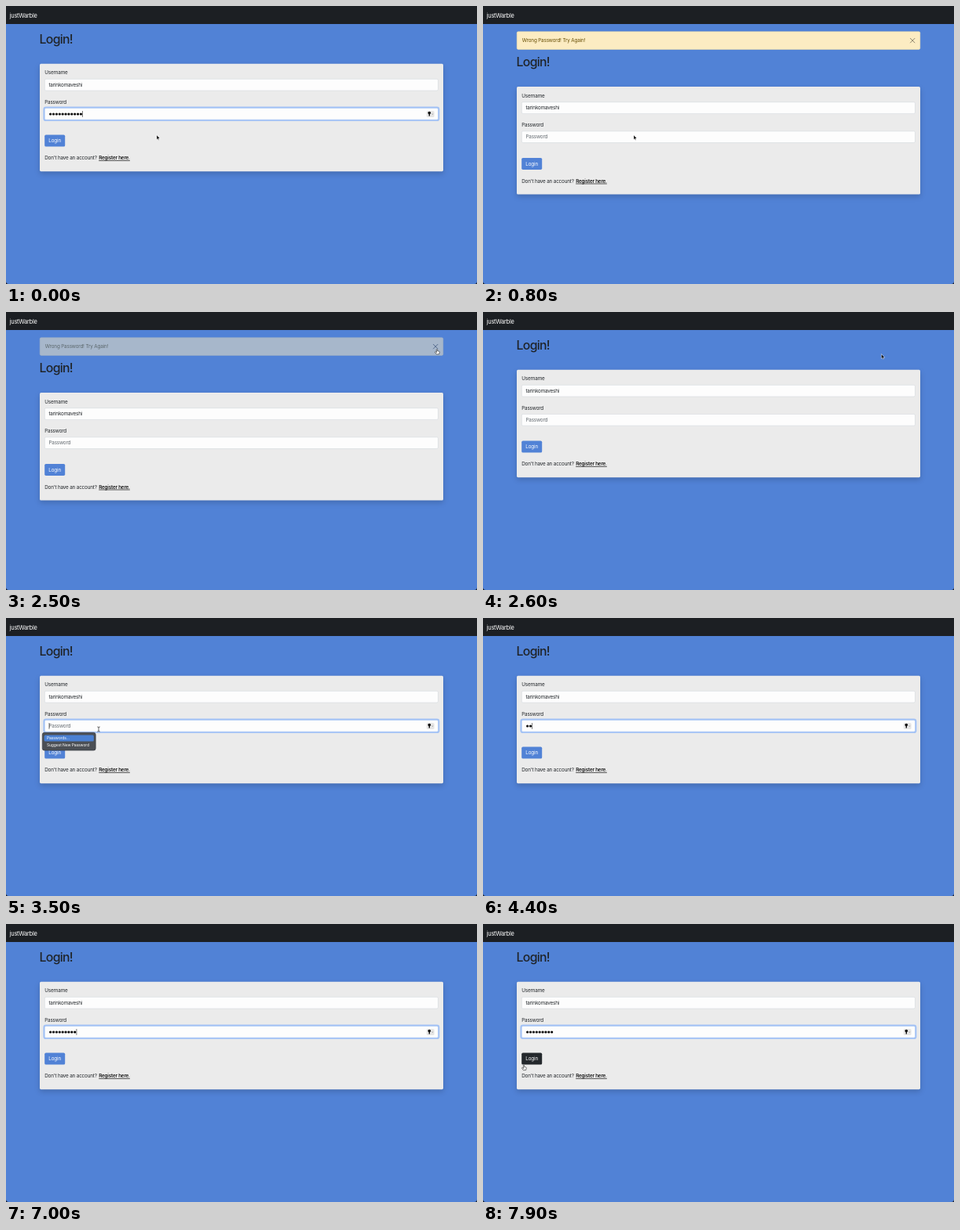
Write an HTML page that moves like this. It is 600x355 px and loops after 8000 ms.

```html
<!DOCTYPE html>
<html lang="en">
<head>
<meta charset="utf-8">
<title>Login</title>
<style>
  html, body { margin: 0; width: 100%; height: 100%; overflow: hidden; background: #111; }
  svg { display: block; width: 600px; height: 355px; }
  text { font: 6.3px Inter, "Open Sans", sans-serif; letter-spacing: -.025em; fill: #1f2327; }
  .brand { font-size: 7.5px; letter-spacing: -.035em; fill: #fff; }
  .title { font-size: 15.8px; font-weight: 500; letter-spacing: -.045em; }
  .link { font-weight: 500; text-decoration: underline; fill: #000; }
  .hint { fill: #62696f; }
  .warn { fill: #664d03; }
  .white { fill: #fff; }
  .menu text { font-size: 5px; letter-spacing: -.02em; fill: #fff; }
  .card { fill: #ebebeb; filter: drop-shadow(0 3px 3.2px rgba(0, 0, 0, .17)); }
  .field { fill: #fdfdfd; stroke: #cdd2d8; stroke-width: .5; }
  .pointer { stroke-linejoin: round; stroke-linecap: round; }
</style>
</head>
<body>
<svg viewBox="0 0 600 355">
  <path fill="#5182d6" d="M0 0H600V351.500Q600 355 596.500 355H3.500Q0 355 0 351.500Z"/>
  <rect width="600" height="23" fill="#1c1f23"/>
  <text class="brand" x="4.700" y="14.700">justWarble</text>

  <g id="alert">
    <rect x="43.200" y="32.700" width="513.600" height="22.700" rx="1.600" fill="#fcecc2" stroke="#f6e0a6" stroke-width=".5"/>
    <text class="warn" x="49.800" y="46.400">Wrong Password! Try Again!</text>
    <path id="close" d="M544.400 41.300l5.600 5.600m0-5.600l-5.600 5.600" stroke="#000" stroke-width=".8" stroke-linecap="round"/>
  </g>

  <g id="page">
    <text class="title" x="42.600" y="48">Login!</text>
    <rect class="card" x="43" y="73.700" width="514" height="137.500" rx="1.600"/>
    <text x="49.200" y="87.400">Username</text>
    <rect class="field" x="49.300" y="93.300" width="501.200" height="14.700" rx="1.600"/>
    <text x="54.400" y="102.900">tarinkomaveshi</text>
    <text x="49.200" y="124.700">Password</text>
    <rect id="ring" x="48.300" y="129.400" width="503.200" height="16.800" rx="2.500" fill="none" stroke="#a3c2f5" stroke-width="1.800"/>
    <rect id="secret" class="field" x="49.300" y="130.400" width="501.200" height="14.800" rx="1.600"/>
    <text id="hint" class="hint" x="54.400" y="140">Password</text>
    <g id="dots"></g>
    <rect id="caret" y="134" width=".6" height="7.800" fill="#222"/>
    <g id="key">
      <rect x="535.800" y="133.900" width="9.800" height="8" rx="1.500" fill="#e6e6e6"/>
      <circle cx="539.300" cy="136.500" r="1.800"/>
      <path d="M539.300 137v3.600" stroke="#000" stroke-width="1.300"/>
      <path d="M542.500 137.500l.9.900.9-.9" fill="none" stroke="#555" stroke-width=".5"/>
    </g>
    <rect id="button" x="49.200" y="164.500" width="26" height="15.100" rx="1.700"/>
    <text class="white" x="54.300" y="174.300">Login</text>
    <text x="49.200" y="196.300">Don't have an account?</text>
    <text class="link" x="118.200" y="196.300">Register here.</text>
  </g>

  <g id="menu" class="menu">
    <rect x="46.300" y="146.300" width="67.900" height="22.800" rx="2.700" fill="#4b4f55" stroke="#33373d" stroke-width=".6"/>
    <rect x="48.600" y="149.400" width="63.200" height="8" rx="1.500" fill="#4a80d3"/>
    <text x="51.900" y="155.200">Passwords…</text>
    <text x="51.900" y="164">Suggest New Password</text>
  </g>

  <g id="cursor" class="pointer">
    <path id="arrow" d="M0 0V5.500L1.300 4.400L2.100 6.300L3 5.900L2.200 4.100H3.900Z" fill="#000" stroke="#fff" stroke-width=".45"/>
    <path id="beam" d="M-1.300-3Q0-3 0-2.300V2.300Q0 3-1.300 3M1.300-3Q0-3 0-2.300M0 2.300Q0 3 1.300 3" fill="none" stroke="#222" stroke-width=".7"/>
    <path id="hand" d="M-.6.500Q0-.3.600.500V2.400L2.700 2.900Q3.400 3.200 3.200 4.200L2.600 6.600H-.7L-2.500 4.100Q-2.500 3.200-1.600 3.500L-.6 4.300Z" fill="#fff" stroke="#222" stroke-width=".6"/>
  </g>
</svg>
<script>
const LOOP = 8000, STEP = 100, SHIFT = 29.4;
const DOT_START = 54.7, DOT_GAP = 3.88;
const $ = id => document.getElementById(id);
const show = (id, on) => $(id).setAttribute("opacity", Number(on));

// [time, dots in the password field]
const typing = [[0, 11], [800, 0], [3900, 1], [4400, 2], [4900, 3], [5100, 4], [5500, 5],
  [5800, 6], [6000, 7], [6400, 6], [6700, 7], [6900, 8], [7000, 9]];

// [time, x, y] of the pointer's hot spot
const path = [[0, 192, 165], [1200, 192, 165], [1500, 270, 142], [1800, 450, 85], [2100, 553, 51],
  [2300, 549, 47.3], [2500, 549, 47.3], [2600, 507.5, 54], [2900, 300, 96], [3100, 165, 129],
  [3300, 118, 142], [7200, 74, 152], [7500, 23, 198], [7800, 52, 180], [8000, 52, 180]];

for (let i = 0; i < 11; i++) {
  const dot = document.createElementNS("http://www.w3.org/2000/svg", "circle");
  dot.setAttribute("cx", DOT_START + DOT_GAP * (i + .5));
  dot.setAttribute("cy", 138);
  dot.setAttribute("r", 1.6);
  $("dots").append(dot);
}

function pointerAt(t) {
  if (t >= 3300 && t < 7200) return [118, 142];
  const i = path.findIndex(p => p[0] > t);
  const [a, b] = [path[i - 1], path[i]];
  const k = (t - a[0]) / (b[0] - a[0]);
  return [a[1] + (b[1] - a[1]) * k, a[2] + (b[2] - a[2]) * k];
}

function draw(t) {
  const alerted = t >= 800 && t < 2600;
  const shift = alerted ? SHIFT : 0;
  $("page").setAttribute("transform", `translate(0 ${shift})`);
  show("alert", alerted ? (t >= 2500 ? .5 : 1) : 0);

  const focus = t < 800 || t >= 3500 ? 1 : t >= 3400 ? .6 : 0;
  show("ring", focus);
  show("key", focus);
  $("secret").style.stroke = focus ? "#86b1f5" : "";

  const count = typing.filter(s => s[0] <= t).pop()[1];
  [...$("dots").children].forEach((dot, i) => dot.setAttribute("opacity", i < count ? 1 : 0));
  show("hint", !count);
  $("caret").setAttribute("x", DOT_START + DOT_GAP * count);
  show("caret", focus && t < 7500);
  show("menu", t >= 3500 && t < 4000 ? 1 : t === 4000 ? .5 : 0);

  const [x, y] = pointerAt(t);
  const within = (left, top, right, bottom) => x >= left && x <= right && y >= top && y <= bottom;
  const onClose = alerted && within(540, 38, 552, 50);
  const onButton = within(49, 164.5 + shift, 75, 180.5 + shift);
  const onField = t >= 1300 && (within(49, 93 + shift, 551, 108 + shift) || within(49, 130 + shift, 551, 145 + shift));
  $("cursor").setAttribute("transform", `translate(${x} ${y})`);
  show("cursor", t < 3900 || t >= 7300);
  show("hand", onClose || onButton);
  show("beam", onField);
  show("arrow", !(onClose || onButton || onField));
  show("close", onClose ? .8 : .55);
  $("button").setAttribute("fill", onButton ? "#24282c" : "#5182d6");
}

const start = performance.now();
function tick() {
  const t = (performance.now() - start) % LOOP;
  draw(Math.floor(t / STEP) * STEP);
  requestAnimationFrame(tick);
}
tick();
</script>
</body>
</html>
```
